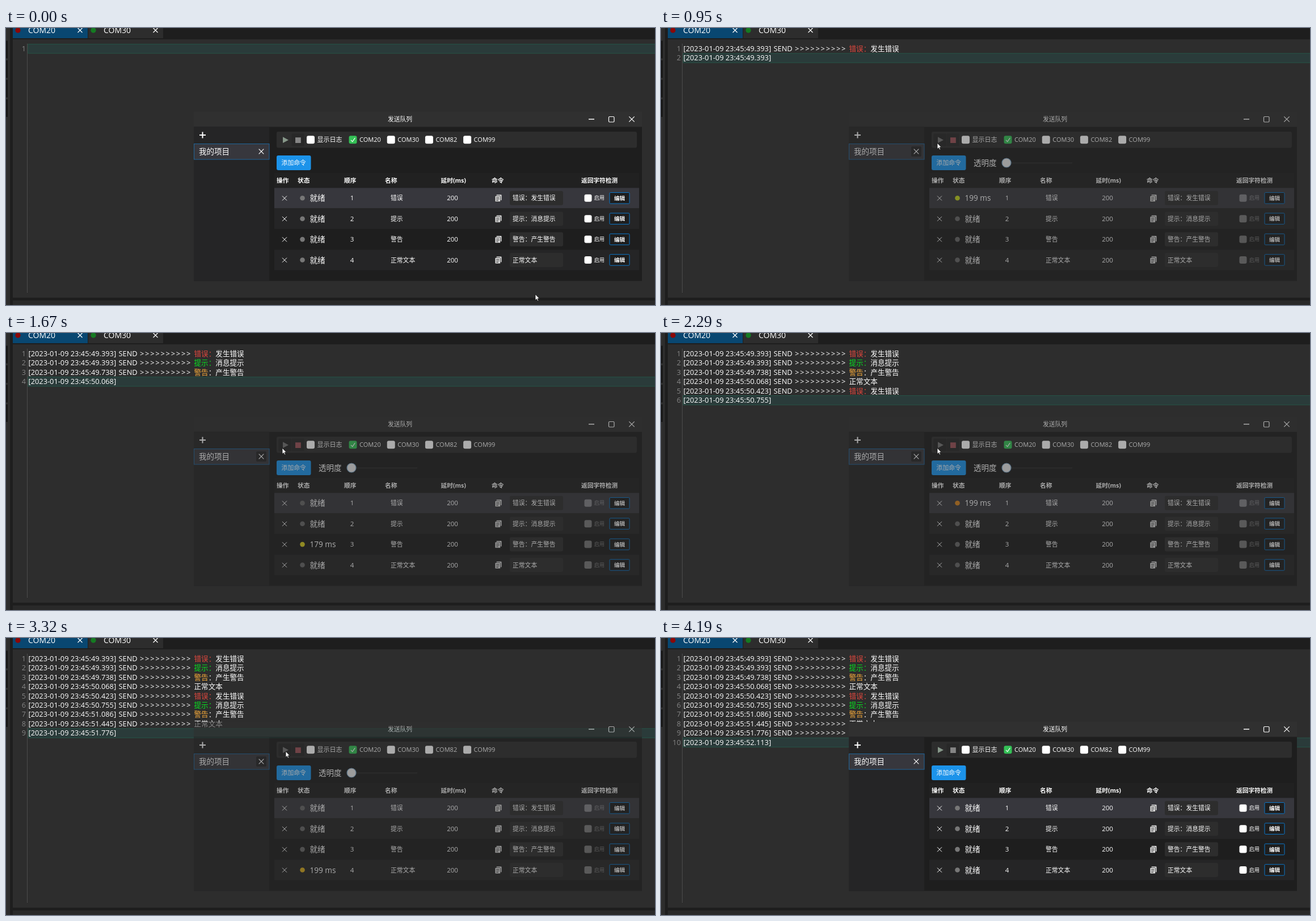
Recreate the animation shown at these times as an HTML page. Size 1144x489 px, loop 4.82 s.

```html
<!DOCTYPE html>
<html lang="zh-CN">
<head>
<meta charset="utf-8">
<title>发送队列</title>
<style>
html, body { margin: 0; width: 100%; height: 100%; overflow: hidden; background: #2d2d2d; }
svg { display: block; width: 100vw; height: 100vh; }
text { font-family: "Open Sans", "Noto Sans CJK SC", "Noto Sans CJK", sans-serif; fill: #fff; }
</style>
</head>
<body>
<svg id="stage" viewBox="0 0 1144 489"></svg>
<script>
const LOOP = 4820;
const COUNT = 10;
const RED = '#e0483e', GREEN = '#08e020', ORANGE = '#f4a93a';
const ROWS = [
  ['错误', '发生错误', RED],
  ['提示', '消息提示', GREEN],
  ['警告', '产生警告', ORANGE],
  ['正常文本', '', '#fff']
];
const STAMPS = ['49.393', '49.393', '49.738', '50.068', '50.423', '50.755', '51.086', '51.445', '51.776', '52.113'];
const SENDS = [948, 1300, 1626, 1965, 2296, 2640, 2965, 3305, 3645];
const HUES = [66, 62, 57, 45, 33, 38, 42, 46, 48];
const START = 870, STOP = 3800;
// screen refresh bursts: first, last, how many
const BURSTS = [[70, 560, 7], [630, 700, 2], [870, 1340, 7], [1440, 1890, 7], [1970, 2460, 7],
  [2510, 2990, 7], [3070, 3540, 7], [3650, 4140, 7], [4190, 4190, 1]];
const TICKS = [0];
for (const [a, b, n] of BURSTS)
  for (let i = 0; i < n; i++) TICKS.push(n > 1 ? a + (b - a) * i / (n - 1) : a);
const POINTER = [[0, 933, 470], [560, 486, 212], [630, 488, 207], [700, 488, 203], [870, 487, 203],
  [3070, 487, 203], [3305, 493, 200], [3650, 514, 197], [3815, 514, 197], [4140, 694, 287]];

const attrs = o => Object.entries(o).map(([k, v]) => ` ${k}="${v}"`).join('');
const rect = (x, y, w, h, fill, o = {}) =>
  `<rect x="${x}" y="${y}" width="${w}" height="${h}" fill="${fill}"${attrs(o)}/>`;
const text = (x, y, size, s, o = {}) => `<text x="${x}" y="${y}" font-size="${size}"${attrs(o)}>${s}</text>`;
const circle = (x, y, r, fill, o = {}) => `<circle cx="${x}" cy="${y}" r="${r}" fill="${fill}"${attrs(o)}/>`;
const path = (d, o) => `<path d="${d}"${attrs({ fill: 'none', ...o })}/>`;
const group = (s, o = {}) => `<g${attrs(o)}>${s}</g>`;
const cross = (x, y, r, w = 1.2) =>
  path(`M${x - r} ${y - r}l${2 * r} ${2 * r}m0 ${-2 * r}l${-2 * r} ${2 * r}`, { stroke: '#fff', 'stroke-width': w });
const mid = { 'text-anchor': 'middle' };
const lineY = i => 28 + 16.43 * i;
const rowY = i => 300.3 + 36.4 * i;

function frame() {
  let s = rect(0, 0, 1144, 489, '#2d2d2d') + rect(7, 0, 5, 489, '#1e1e1e') + rect(12, 0, 1132, 20, '#1e1e1e');
  for (let i = 0; i < 4; i++) s += rect(0, 22.5 + 34.5 * i, 3, 31, '#151515');
  s += rect(12, 0, 132, 18, '#094771') + rect(145, 0, 132, 18, '#2d2d2d');
  s += circle(21, 4, 4.7, '#8b0808') + circle(154, 4, 4.7, '#157a22');
  s += text(39, 9.2, 14, 'COM20') + text(172, 9.2, 14, 'COM30') + cross(130.5, 4, 4) + cross(263.5, 4, 4);
  s += rect(12, 476, 1132, 5, '#1e1e1e') + rect(12, 481, 1132, 8, '#292929');
  return s + path('M37.5 28V467', { stroke: '#6a6a6a', 'stroke-dasharray': '1 1' });
}

function logLine(i) {
  const [head, body, color] = ROWS[i % 4];
  const y = lineY(i) + 12.9;
  const colon = color === ORANGE ? '#fff' : color;
  const msg = `<tspan style="fill:${color}">${head}</tspan>` +
    (body && `<tspan style="fill:${colon}">：</tspan>${body}`);
  const tail = text(198.5, y, 12.8, 'SEND') +
    text(236, y, 12.8, '&gt;'.repeat(10), { 'letter-spacing': 1.8 }) + text(331.5, y, 12.6, msg);
  return group(
    text(35, y, 12.8, i + 1, { 'text-anchor': 'end', style: 'fill:#858585' }) +
    text(39.5, y, 12.8, `[2023-01-09 23:45:${STAMPS[i]}]`, { id: 'stamp' + i }) +
    group(tail, { id: 'tail' + i }), { id: 'line' + i });
}

function checkbox(x, y, label, on) {
  return rect(x, y, 14, 14, on ? '#34c056' : '#fff', { rx: 3 }) +
    (on ? path(`M${x + 3.5} ${y + 7.5}l2.7 2.8l4.5 -6.5`, { stroke: '#fff', 'stroke-width': 1.2 }) : '') +
    text(x + 18.5, y + 11, 11, label);
}

function row(i) {
  const [name, body] = ROWS[i];
  const y = rowY(i), b = y + 4;
  const copy = rect(864.5, y - 6, 9, 10, '#ddd', { rx: 1 }) +
    rect(862, y - 4, 9.5, 10.5, '#ddd', { rx: 1, stroke: '#222', 'stroke-width': .8 }) +
    path(`M864 ${y - 1}h5.5m-5.5 2.5h5.5m-5.5 2.5h4`, { stroke: '#333' });
  const enable = rect(1019.5, y - 6.5, 13, 13, '#fff', { rx: 3 }) + text(1036.5, y + 3, 9.3, '启用');
  return rect(473, y - 18, 643, 36, '#252526', { id: 'row' + i }) +
    cross(491, y + .2, 4, 1) + circle(522.5, y, 4.3, '#777', { id: 'dot' + i }) +
    text(535.5, y + 5, 13.6, '就绪', { id: 'state' + i }) +
    text(610, b, 11.5, i + 1, mid) + text(678, b, 10.8, name) + text(787, b, 11.5, 200, mid) +
    copy + rect(888, y - 12.5, 94, 25, '#2d2d2d', { rx: 3 }) +
    text(893, b, 10.8, body ? name + '：' + body : name) +
    group(enable, { class: 'enable' }) +
    rect(1064, y - 9.8, 35, 19.5, '#1e1e1e', { rx: 1.5, stroke: '#0b78cc' }) +
    text(1081.5, y + 3.6, 9.6, '编辑', { ...mid, 'font-weight': 600 });
}

function dialog() {
  let s = rect(331, 148, 790, 298.5, '#1e1e1e') + rect(331, 148, 790, 26.5, '#303030');
  s += text(694.5, 165, 10.8, '发送队列', mid);
  s += path('M1027 161h10', { stroke: '#fff', 'stroke-width': 1.5 });
  s += rect(1062.5, 156.5, 9.5, 9.5, 'none', { rx: 1.5, stroke: '#fff', 'stroke-width': 1.2 }) + cross(1103, 161, 4.7);
  s += rect(331, 174.5, 133, 272, '#252526');
  s += path('M341 189h11m-5.5 -5.5v11', { stroke: '#fff', 'stroke-width': 2 });
  s += rect(331.5, 204.5, 132.5, 27.5, '#37373d', { stroke: '#20659a' });
  s += rect(441, 209, 18, 18, '#252528', { id: 'tabHover', rx: 2 });
  s += text(340, 223, 13.5, '我的项目') + cross(450, 218, 4.3);
  s += rect(477, 183, 635, 28.5, '#2d2d2d', { rx: 3 });
  s += rect(480.5, 186.5, 22.5, 22, '#262626', { id: 'playBg', rx: 2 });
  s += rect(503.5, 186.5, 22, 22, '#282828', { rx: 2 });
  s += path('M488 192.3L498 197.7L488 203Z', { id: 'play' }) + rect(510, 193.2, 9.8, 9.8, '#858585', { id: 'stop' });
  s += checkbox(530, 190.3, '显示日志');
  ['COM20', 'COM30', 'COM82', 'COM99'].forEach((c, i) => s += checkbox(604.5 + 67.2 * i, 190.3, c, !i));
  s += rect(477, 225, 60.5, 26, '#1c93ea', { rx: 3 }) + text(507.2, 242, 10.8, '添加命令', mid);
  s += group(text(551, 243.3, 13.5, '透明度') + rect(610, 237.3, 115, 2, '#2b2b2b') +
    circle(609, 238, 8, '#e6e6e6', { stroke: '#7ba6c8', 'stroke-width': 1.2 }), { id: 'slider' });
  s += rect(473, 256, 643, 26, '#212121');
  const heads = { 操作: 477, 状态: 514, 顺序: 596, 名称: 668, '延时(ms)': 766.5, 命令: 856, 返回字符检测: 1014 };
  for (const h in heads) s += text(heads[h], 273.2, 10.7, h, { 'font-weight': 700 });
  return s + ROWS.map((_, i) => row(i)).join('');
}

function pointer() {
  const ink = { fill: '#fff', stroke: '#111', 'stroke-width': .8, 'stroke-linejoin': 'round' };
  return group(
    path('M0 0V10.6L2.4 8.4L4 12L5.7 11.2L4.1 7.8H7.3Z', { id: 'arrow', ...ink }) +
    path('M-1 1Q0 -1 1.2 1V6L5 7Q6.2 7.5 6 9.5L5 15.5H-1.5L-4.6 9.8Q-4.5 8 -2.6 8.8L-1 10.5Z', { id: 'hand', ...ink }),
    { id: 'pointer' });
}

document.getElementById('stage').innerHTML = frame() +
  rect(39, 28, 1110, 16.4, '#2a3b3a', { id: 'current', stroke: '#245648', 'stroke-width': .9 }) +
  STAMPS.map((_, i) => logLine(i)).join('') + group(dialog(), { id: 'dialog' }) + pointer();

const el = {};
document.querySelectorAll('[id]').forEach(n => el[n.id] = n);
const enables = document.querySelectorAll('.enable');
const show = (id, on) => { el[id].style.display = on ? '' : 'none'; };
const paint = (id, color) => el[id].setAttribute('fill', color);

function pointerAt(t) {
  let i = 1;
  while (i < POINTER.length - 1 && POINTER[i][0] < t) i++;
  const [t0, x0, y0] = POINTER[i - 1], [t1, x1, y1] = POINTER[i];
  const k = Math.min(1, (t - t0) / (t1 - t0));
  return [x0 + (x1 - x0) * k, y0 + (y1 - y0) * k];
}

function draw(now) {
  const t = TICKS.filter(v => v <= now + 8).pop();
  const running = t >= START && t < STOP;
  const sent = SENDS.filter(v => v <= t).length;

  el.current.setAttribute('y', lineY(sent) + .4);
  for (let i = 0; i < COUNT; i++) {
    show('line' + i, i <= sent);
    show('stamp' + i, sent > 0);
    show('tail' + i, i < sent);
  }

  // the window fades over one refresh each way
  const fade = Math.min(1, Math.max(0, t < 2000 ? (t - 790) / 158 : (3890 - t) / 150));
  el.dialog.setAttribute('opacity', 1 - .4 * fade);
  const [x, y] = pointerAt(t);
  const overPlay = t >= 630 && t < 3600;
  show('slider', running);
  show('tabHover', running);
  show('playBg', overPlay);
  paint('play', running ? '#747474' : overPlay ? '#94ab94' : '#87988a');
  paint('stop', running ? '#9c5158' : '#858585');
  enables.forEach(n => n.setAttribute('opacity', running ? .38 : 1));

  const active = running && sent ? (sent - 1) % 4 : -1;
  for (let i = 0; i < 4; i++) {
    const on = i === active;
    const hover = Math.abs(y - rowY(i)) < 18 && t < 4190;
    const left = on ? Math.max(0, 199 - 20 * Math.floor((t - SENDS[sent - 1]) / 34)) : 0;
    paint('row' + i, i === 0 ? '#37373d' : hover ? '#2a2d2e' : i === 2 ? '#1e1e1e' : '#252526');
    paint('dot' + i, on ? `hsl(${HUES[sent - 1]} 75% 47%)` : running ? '#666' : '#777');
    el['state' + i].textContent = on ? left + ' ms' : '就绪';
  }

  const hand = t >= 630 && t < START || running && x > 503;
  show('pointer', t < 4190);
  show('arrow', !hand);
  show('hand', hand);
  el.pointer.setAttribute('transform', `translate(${x} ${y})`);
}

const begin = performance.now();
function loop() {
  draw((performance.now() - begin) % LOOP);
  requestAnimationFrame(loop);
}
loop();
</script>
</body>
</html>
```
